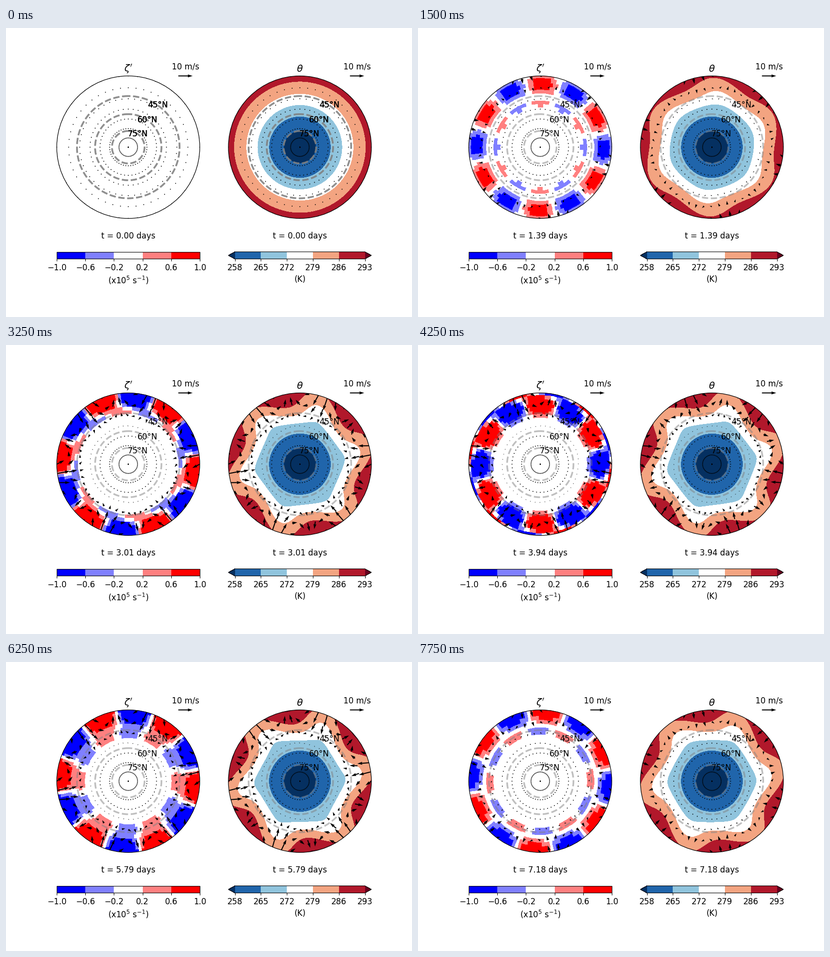
Write a matplotlib script that moves like this. It is 840x600 px and loops after 8 s.

```python
import numpy as np
import matplotlib.pyplot as plt
from matplotlib.animation import FuncAnimation
from matplotlib.cm import ScalarMappable
from matplotlib.colors import BoundaryNorm, ListedColormap
from matplotlib.patches import Circle

W, H, DPI = 840, 600, 100
FRAMES, INTERVAL = 32, 250
DAYS_PER_FRAME = 20000 / 86400
SIZE = 651 / 2.2             # two panels with a gap of a fifth of a panel
R = SIZE / 2                 # panel radius in pixels, at 30N
CY = 395.4 - R
SCALE = R / np.tan(np.radians(30))
WAVE = 6
DRIFT = 21.1                 # westward phase drift, degrees per day

plt.rcParams.update({"font.family": "DejaVu Sans", "font.size": 12,
                     "mathtext.fontset": "dejavusans"})


def radius(colat):
    return SCALE * np.tan(colat / 2)


def wave(amp, phase):
    """Complex amplitude of a wave whose crest lies at the given angle."""
    return amp * np.exp(-1j * WAVE * np.radians(phase))


# Grid: 64 latitudes by 144 longitudes, pole included
NLON = 144
DLAT, DLON = np.pi / 63, 2 * np.pi / NLON
rows = np.arange(22)
row_r = radius(rows * DLAT)
edge_r = radius(np.maximum(np.arange(23) - 0.5, 0) * DLAT)
cell_ang = np.arange(NLON) * DLON - np.pi / 2
edge_ang = (np.arange(NLON + 1) - 0.5) * DLON - np.pi / 2

# Key states: index, vorticity bumps (amp, crest, radius, width),
# northward wind amplitude, meridional displacement (degrees, crest)
STATES = [
    (0, [], 0, (0, 0)),
    (6, [(1.1, 28, 131, 16.5), (.42, 30, 92.3, 7.6)], 4, (2.8, 56)),
    (13, [(2.8, 54, 152, 28), (.6, 34, 110, 8.5)], 9, (6.7, 43)),
    (17, [(2.5, 30, 124, 16), (1.0, 51, 150, 10)], 8, (6.7, 44)),
    (21, [(.95, 1, 131.5, 17), (.45, 28, 102.5, 7)], 2.5, (6.0, 42)),
    (25, [(2.9, -5, 155, 30), (.45, 0, 99, 13)], 9, (7.4, 38)),
    (31, [(1.7, -35, 150, 22), (.55, 2, 107, 9.5)], 5, (5.6, 37)),
]
frame_ids = np.arange(FRAMES)
key_ids = np.array([s[0] for s in STATES])


def spin(ids):
    return wave(1, -DRIFT * DAYS_PER_FRAME * ids)


def bump_sum(bumps):
    total = np.zeros(len(rows), complex)
    for amp, crest, mid, width in bumps:
        total += wave(amp, crest) * np.exp(-((row_r - mid) / width) ** 2)
    return total


# Interpolate in the frame that drifts with the wave, then spin back
keys = np.array([bump_sum(s[1]) for s in STATES]) / spin(key_ids)[:, None]
vorticity = np.array([np.interp(frame_ids, key_ids, col) for col in keys.T]).T
vorticity = vorticity * spin(frame_ids)[:, None]
wind = np.interp(frame_ids, key_ids, [s[2] for s in STATES])
wind = wind * wave(1, 132.6) * spin(frame_ids)
shift = np.interp(frame_ids, key_ids, [wave(*s[3]) for s in STATES])

cell_wave = np.exp(1j * WAVE * cell_ang)


# Wind from a non-divergent streamfunction
def stream(colat):
    s = radius(colat) / R
    return s ** 6.7 / (1 + (s / .83) ** 6) * (1 + .83 ** -6)


QC, QA = np.meshgrid(rows[::3] * DLAT, cell_ang[::3], indexing="ij")
COS30 = np.cos(np.radians(30))
v_shape = COS30 * stream(QC) / np.maximum(np.sin(QC), 1e-6)
STEP = 1e-4
u_shape = COS30 * (stream(QC + STEP) - stream(np.abs(QC - STEP))) / (2 * STEP)
u_shape = u_shape / (1j * WAVE)
q_wave = np.exp(1j * WAVE * QA)


def arrows(i):
    east = (wind[i] * u_shape * q_wave).real
    north = (wind[i] * v_shape * q_wave).real
    return (-east * np.sin(QA) - north * np.cos(QA),
            east * np.cos(QA) - north * np.sin(QA))


# Temperature, carried along by a slightly tilted meridional displacement
t_colat = np.radians(np.linspace(0, 61, 62))
t_ang = np.linspace(0, 2 * np.pi, 241)
TC, TA = np.meshgrid(t_colat, t_ang, indexing="ij")
TR = radius(TC)
TX, TY = TR * np.cos(TA), TR * np.sin(TA)
t_wave = np.exp(1j * WAVE * (TA - np.radians(.15 * (TR - 130))))
t_shape = TR ** 10 / (TR ** 10 + 100.0 ** 10)


def temperature(i):
    moved = np.radians((shift[i] * t_wave).real) * t_shape
    return 300 - 45 * np.cos(TC + moved) ** 2


z_levels = [-1, -.6, -.2, .2, .6, 1]
z_cmap = ListedColormap([(0, 0, 1), (.5, .5, 1), (1, 1, 1), (1, .5, .5), (1, 0, 0)])
z_norm = BoundaryNorm(z_levels, 5)
t_levels = [258, 265, 272, 279, 286, 293]
t_colors = [plt.get_cmap("RdBu_r")(p) for p in (0, .1, .3, .5, .7, .9, 1.0)]
t_colors[3] = (1, 1, 1, 1)

fig = plt.figure(figsize=(W / DPI, H / DPI), dpi=DPI, facecolor="white")


def box(x, top, w, h):
    return [x / W, 1 - (top + h) / H, w / W, h / H]


class Panel:
    def __init__(self, x, title):
        self.ax = ax = fig.add_axes(box(x, CY - R, SIZE, SIZE))
        ax.axis("off")
        ax.set_title(title, fontsize=14.4)
        self.rim = Circle((0, 0), R, fill=False, ec="black", lw=.9,
                          zorder=4, clip_on=False)
        ax.add_patch(self.rim)
        style = dict(units="width", width=.007, scale=100)
        QR = radius(QC)
        self.quiver = ax.quiver(QR * np.cos(QA), QR * np.sin(QA), *arrows(0),
                                zorder=1.5, **style)
        self.quiver.set_clip_path(self.rim)
        ax.quiver([.8 * R], [R], [10], [0], pivot="mid", clip_on=False,
                  zorder=5, **style)
        ax.text(.8 * R, R + 10, "10 m/s", ha="center", va="bottom")
        self.clock = ax.text(0, CY - 437, "", ha="center")
        # the opening frame carries the graticule three times over
        self.extras = self.graticule() + self.graticule()
        self.graticule()
        self.fix_view()

    def fix_view(self):
        self.ax.set_xlim(-R, R)
        self.ax.set_ylim(-R, R)

    def graticule(self):
        made = []
        a = np.pi / 2 + np.linspace(0, 2 * np.pi, 361)
        label_ang = np.radians(55)
        for lat in (45, 60, 75):
            r = radius(np.radians(90 - lat))
            made += self.ax.plot(r * np.cos(a), r * np.sin(a), "--", color="gray",
                                 lw=2.5, alpha=.5, zorder=2)
            made.append(self.ax.text(r * np.cos(label_ang), r * np.sin(label_ang),
                                     f"{lat}°N", ha="center", va="center", zorder=3))
        return made

    def update(self, i):
        self.quiver.set_UVC(*arrows(i))
        self.clock.set_text(f"t = {i * DAYS_PER_FRAME:.2f} days")
        for artist in self.extras:
            artist.set_visible(i == 0)


def colorbar(x, cmap, norm, levels, label):
    cax = fig.add_axes(box(x, 464.7, SIZE, SIZE / 20))
    bar = fig.colorbar(ScalarMappable(norm, cmap), cax=cax,
                       orientation="horizontal", ticks=levels)
    bar.minorticks_off()
    bar.set_label(label)


X1, X2 = 105, 756 - SIZE
left = Panel(X1, r"$\zeta'$")
right = Panel(X2, r"$\theta$")
colorbar(X1, z_cmap, z_norm, z_levels, r"(x10$^5$ s$^{-1}$)")
colorbar(X2, ListedColormap(t_colors), BoundaryNorm(t_levels, 7, extend="both"),
         t_levels, "(K)")

ER, EA = np.meshgrid(edge_r, edge_ang, indexing="ij")
mesh = left.ax.pcolormesh(ER * np.cos(EA), ER * np.sin(EA),
                          np.zeros((len(rows), NLON)),
                          cmap=z_cmap, norm=z_norm, zorder=1)
mesh.set_clip_path(left.rim)
left.fix_view()
fills = []


def update(i):
    mesh.set_array((vorticity[i][:, None] * cell_wave).real)
    while fills:
        fills.pop().remove()
    fill = right.ax.contourf(TX, TY, temperature(i), t_levels, colors=t_colors,
                             extend="both", zorder=1)
    fill.set_clip_path(right.rim)
    fills.append(fill)
    right.fix_view()
    left.update(i)
    right.update(i)
    return []


anim = FuncAnimation(fig, update, frames=FRAMES, interval=INTERVAL,
                     init_func=lambda: [], repeat=True, repeat_delay=0, blit=False)
plt.show()
```
